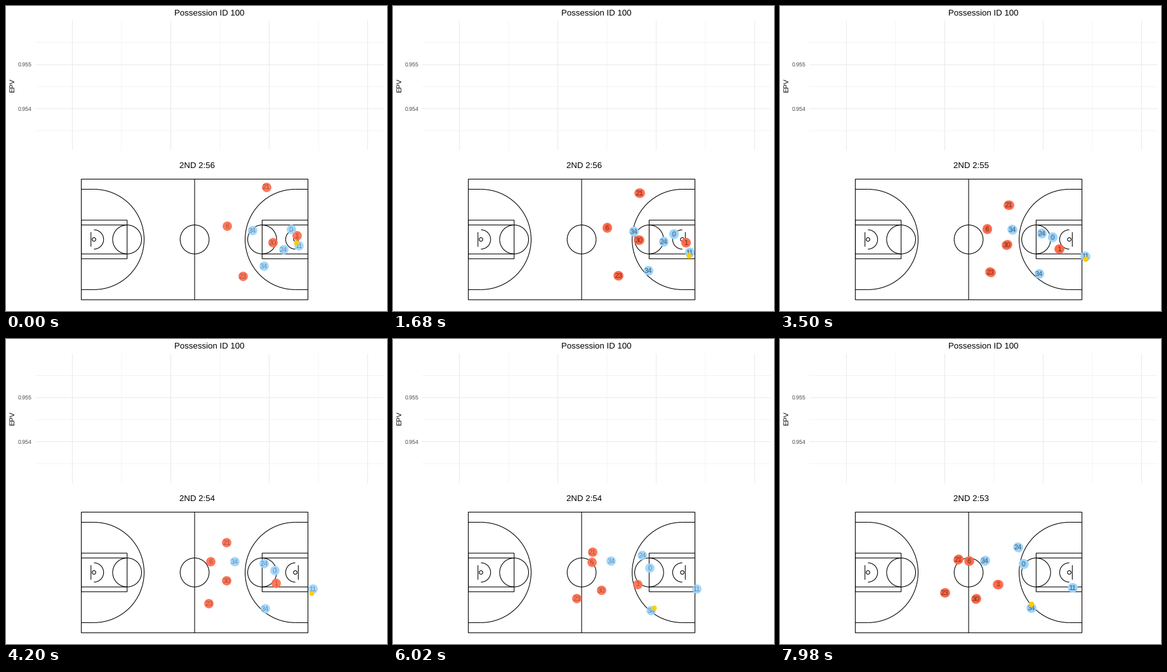
Recreate the animation shown at these times as a matplotlib script. Size 600 by 480 pixels, loop 8000 ms.

```python
import numpy as np
import matplotlib.pyplot as plt
from matplotlib.animation import FuncAnimation
from matplotlib.patches import Arc, Circle, Rectangle

W, H, DPI = 600, 480, 100
PX = 72 / DPI                 # points per pixel
LOOP, TICK, HOLD = 8000, 20, 140

plt.rcParams.update({"font.family": "Liberation Sans",
                     "text.hinting": "none", "path.snap": False})
fig = plt.figure(figsize=(W / DPI, H / DPI), dpi=DPI, facecolor="white")
ax = fig.add_axes([0, 0, 1, 1])
ax.set_xlim(0, W)
ax.set_ylim(H, 0)
ax.set_axis_off()


def line(xs, ys, color="black", lw=1.07, z=2):
    ax.plot(xs, ys, color=color, lw=lw * PX, zorder=z, solid_capstyle="butt",
            solid_joinstyle="miter")


def label(x, y, s, size, ha="center", **kw):
    return ax.text(x, y, s, fontsize=size * PX, ha=ha, va="baseline", **kw)


# Empty chart
GRID = "#EBEBEB"
LEFT, RIGHT, TOP, BOTTOM = 46, 594.5, 23, 227
for k in range(7):
    x = 104.5 + 77.5 * k
    line([x, x], [TOP, BOTTOM], GRID, 0.55 if k % 2 else 1.07, 1)
for k in range(5):
    y = 57.7 + 34.6 * k
    line([LEFT, RIGHT], [y, y], GRID, 1.07 if k % 2 else 0.55, 1)
label(320, 15.2, "Possession ID 100", 13.2)
label(40.6, 95.4, "0.955", 8.8, "right", color="#4D4D4D")
label(40.6, 164.6, "0.954", 8.8, "right", color="#4D4D4D")
label(13, 124.7, "EPV", 11, rotation=90, rotation_mode="anchor")
clock = label(301, 255.2, "", 13.2)

# Court, 94 by 50 feet
FT = 3.797
CX, CY = 297.05, 367.4
X0, X1 = CX - 47 * FT, CX + 47 * FT
Y0, Y1 = CY - 25 * FT, CY + 25 * FT


def outline(patch):
    patch.set(fill=False, edgecolor="black", linewidth=1.07 * PX, zorder=2)
    ax.add_patch(patch)


def ring(x, feet):
    outline(Circle((x, CY), feet * FT))


outline(Rectangle((X0, Y0), X1 - X0, Y1 - Y0))
line([CX, CX], [Y0, Y1])
ring(CX, 6)
for base, d in ((X0, FT), (X1, -FT)):
    key, rim = base + 19 * d, base + 5.25 * d
    half = (-90, 90) if d > 0 else (90, 270)
    outline(Rectangle((base, CY - 8 * FT), key - base, 16 * FT))
    for side in (-FT, FT):
        line([base, key], [CY + 6 * side] * 2)
        line([base, rim], [CY + 20.8 * side] * 2)
    ring(key, 6)
    ring(rim, 0.75)
    line([base + 4 * d] * 2, [CY - 3 * FT, CY + 3 * FT])
    for feet in (4, 20.8):
        outline(Arc((rim, CY), 2 * feet * FT, 2 * feet * FT,
                    theta1=half[0], theta2=half[1]))

# Waypoints as x + y*1j at these tracking rows
KNOTS = np.array([0, 19.5, 40.5, 57, 70, 84.5, 92.5])
RED = [
    ("21", [410+285j, 388.5+294.5j, 360.5+313.5j, 335.3+326.3j,
            314.2+335.3j, 292.5+344j, 281+347j]),
    ("6", [348.5+346j, 337.5+349j, 326.5+351j, 319.3+350.8j,
           313+351j, 304+350j, 298+349.5j]),
    ("30", [420.5+372j, 387.5+368.8j, 357.3+376j, 340+385j,
            328+395.8j, 315.3+405j, 308.7+409j]),
    ("23", [373+425j, 355+424.5j, 331.5+419j, 308+413j,
            289.5+408j, 269.5+402.3j, 259.7+399.3j]),
    ("1", [458+361.3j, 461.7+372.4j, 440+382.5j, 410.7+386j,
           385.7+386j, 358.3+386j, 343.7+386j]),
]
BLUE = [
    ("34", [388.5+353.5j, 379.5+355j, 366+352j, 354.3+349.5j,
            343.7+349.5j, 331+348.7j, 322.5+349j]),
    ("0", [449.5+351j, 442.3+359j, 429.3+364j, 416.5+363.5j,
           404.8+360.3j, 391+356.4j, 383.5+354j]),
    ("24", [437+383.7j, 426.5+371j, 412.5+358.2j, 401.5+349j,
            392.5+340.7j, 381.5+332j, 375+327.8j]),
    ("34", [406+409.5j, 402+416.5j, 408+421.5j, 407.7+426.5j,
            406.7+427j, 400.5+426j, 396+423.5j]),
    ("11", [461+377.5j, 467.3+388j, 481+394j, 484+393j,
            478.2+393.5j, 467+392.3j, 461+391.3j]),
]
BALL_KNOTS = [0, 19.5, 40.5, 53, 70, 84.5, 92.5]
BALL = np.array([457.8+372j, 466.3+393j, 481.7+398.8j, 481+401.3j,
                 411.3+423.3j, 400.5+420j, 395.7+417.7j])
ROWS = np.arange(95)
SHIFT = -0.4 - 0.5j


def glide(points):
    """Cubic Hermite path through the waypoints, one value per row."""
    p = np.array(points) + SHIFT
    m = np.gradient(p, KNOTS)
    i = np.clip(np.searchsorted(KNOTS, ROWS, "right") - 1, 0, len(p) - 2)
    h = KNOTS[i + 1] - KNOTS[i]
    t = (ROWS - KNOTS[i]) / h
    return ((1 + 2 * t) * (1 - t) ** 2 * p[i] + t * (1 - t) ** 2 * h * m[i]
            + t * t * (3 - 2 * t) * p[i + 1] + t * t * (t - 1) * h * m[i + 1])


players = RED + BLUE
paths = np.array([glide(pts) for _, pts in players])
ball_path = np.interp(ROWS, BALL_KNOTS, BALL + SHIFT)


def dots(color, radius, z):
    return ax.scatter([], [], s=(2 * radius * PX) ** 2, c=color, alpha=0.9,
                      linewidths=0, zorder=z)


red = dots("#FF6A4A", 7.4, 3)
blue = dots("#9BD5FF", 7.4, 3.1)
ball = dots("#FFCC00", 4.1, 5)
names = [[label(0, 0, s, 11, alpha=0.34, zorder=4) for s, _ in players]
         for _ in range(2)]


def xy(z):
    z = np.ravel(z)
    return np.column_stack([z.real, z.imag])


def first_row(step):
    return (13 * step + 2) // 8


def draw(i):
    step = i * TICK // HOLD
    # 13 tracking rows fall on every 8 steps, so a step shows one or two
    rows = range(first_row(step), first_row(step + 1))
    red.set_offsets(xy(paths[:len(RED), rows]))
    blue.set_offsets(xy(paths[len(RED):, rows]))
    ball.set_offsets(xy(ball_path[rows]))
    for k, group in enumerate(names):
        for text, path in zip(group, paths):
            text.set_visible(k < len(rows))
            if k < len(rows):
                z = path[rows[k]]
                text.set_position((z.real, z.imag + 3.9))
    clock.set_text(f"2ND 2:{56 - min(step // 15, 3)}")
    return [red, blue, ball, clock, *names[0], *names[1]]


anim = FuncAnimation(fig, draw, frames=LOOP // TICK, interval=TICK,
                     repeat=True, repeat_delay=0, blit=False)
plt.show()
```
